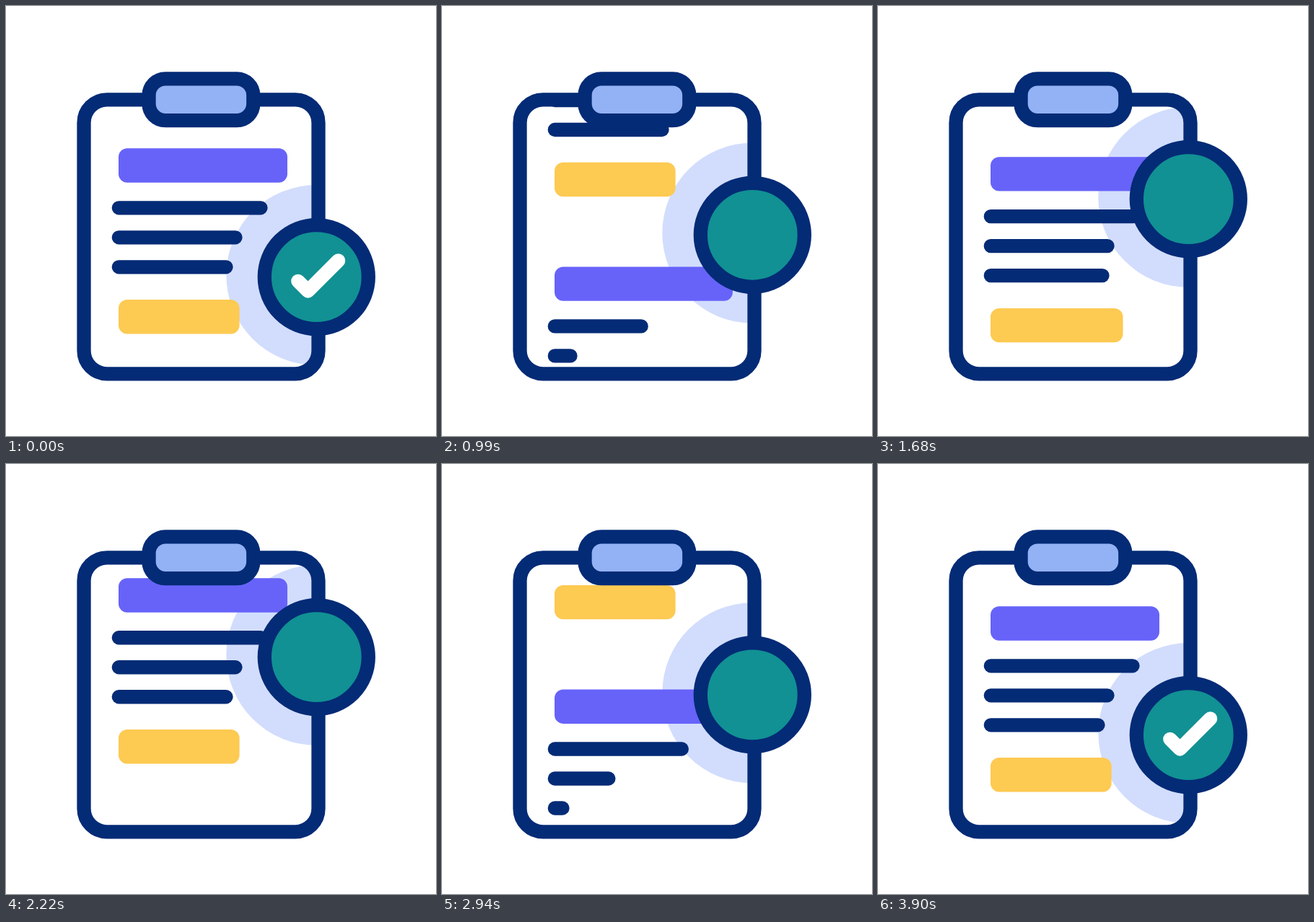
Write an HTML page with a canvas that moves like this. It is 596 px wide and 596 px high and loops after 3.93 s.

```html
<!DOCTYPE html>
<html lang="en">
<head>
<meta charset="utf-8">
<title>Checklist</title>
<style>
html, body { margin: 0; width: 100%; height: 100%; overflow: hidden; background: #fff; }
canvas { display: block; }
</style>
</head>
<body>
<canvas width="596" height="596"></canvas>
<script>
const ctx = document.querySelector('canvas').getContext('2d');
const LOOP = 3930, STEP = 30, PAGE = 354.4, STROKE = 19.3;
const NAVY = '#042b76', PURPLE = '#6763f9', YELLOW = '#fdca52',
      LIGHT = '#d2ddfd', TEAL = '#119193', CLIP = '#93b1f5';

// When each bar of the incoming sheets starts to grow, top to bottom.
const STARTS = [
  [383, 722, 881, 1050, 1200],
  [2282, 2578, 2717, 2862, 3005]
];

function ease(t, from, to) {
  const s = Math.min(1, Math.max(0, (t - from) / (to - from)));
  return s * s * (3 - 2 * s);
}

// Grow to 110 %, then settle at 100 %.
const grow = (t, start) =>
  1.1 * ease(t, start, start + 500) - 0.1 * ease(t, start + 500, start + 730);

function box(x, y, w, h, r) {
  ctx.beginPath();
  ctx.roundRect(x, y, w, h, r);
}

function paint(fill, stroke) {
  if (fill) { ctx.fillStyle = fill; ctx.fill(); }
  if (stroke) { ctx.strokeStyle = stroke; ctx.lineWidth = STROKE; ctx.stroke(); }
}

function disc(x, y, r, fill, stroke) {
  ctx.beginPath();
  ctx.arc(x, y, r, 0, 2 * Math.PI);
  paint(fill, stroke);
}

function block(y, w, color) {
  if (w <= 0) return;
  box(156, y, w, 47.4, Math.min(12, w / 2));
  paint(color);
}

function line(y, w) {
  if (w <= 0) return;
  ctx.beginPath();
  ctx.moveTo(156.3, y);
  ctx.lineTo(156.3 + w, y);
  paint(null, NAVY);
}

function sheet(y, size) {
  block(y + 197.3, 234 * size[0], PURPLE);
  line(y + 279.8, 196.7 * size[1]);
  line(y + 320.8, 161.7 * size[2]);
  line(y + 361.8, 148.7 * size[3]);
  block(y + 407.1, 167.6 * size[4], YELLOW);
}

const board = () => box(108, 129.8, 325, 380, 32);

// Tick drawn between two fractions of its length.
function tick(y, from, to) {
  if (to - from < 0.001) return;
  const a = [404.8, 381.3], b = [418.5, 395], c = [460.6, 352.9];
  const first = Math.hypot(b[0] - a[0], b[1] - a[1]);
  const second = Math.hypot(c[0] - b[0], c[1] - b[1]);
  const bend = first / (first + second);
  const at = f => {
    const [p, q, s] = f < bend ? [a, b, f / bend] : [b, c, (f - bend) / (1 - bend)];
    return [p[0] + (q[0] - p[0]) * s, y + p[1] + (q[1] - p[1]) * s];
  };
  ctx.beginPath();
  ctx.moveTo(...at(from));
  if (from < bend && to > bend) ctx.lineTo(b[0], y + b[1]);
  ctx.lineTo(...at(to));
  paint(null, '#fff');
}

function draw(t) {
  const scroll = PAGE * (ease(t, 0, 1887) + ease(t, 1860, 3605));
  const lift = -114 * (ease(t, 0, 1950) - ease(t, 1950, 3900));

  ctx.fillStyle = '#fff';
  ctx.fillRect(0, 0, 596, 596);

  ctx.save();
  board();
  ctx.clip();
  disc(430.3, 373 + lift, 125, LIGHT);
  sheet(-scroll, [1, 1, 1, 1, 1]);
  STARTS.forEach((starts, i) =>
    sheet((i + 1) * PAGE - scroll, starts.map(s => grow(t, s))));
  ctx.restore();

  board();
  paint(null, NAVY);
  box(198, 100.8, 144.8, 57.8, 23);
  paint(CLIP, NAVY);

  disc(430.3, 375.6 + lift, 72, TEAL, NAVY);
  if (t < 1950) tick(lift, ease(t, 0, 605), 1);
  else tick(lift, 0, ease(t, 3300, 3900));
}

ctx.lineCap = ctx.lineJoin = 'round';
const begin = performance.now();
function frame() {
  const t = (performance.now() - begin) % LOOP;
  draw(Math.floor(t / STEP) * STEP);
  requestAnimationFrame(frame);
}
frame();
</script>
</body>
</html>
```
